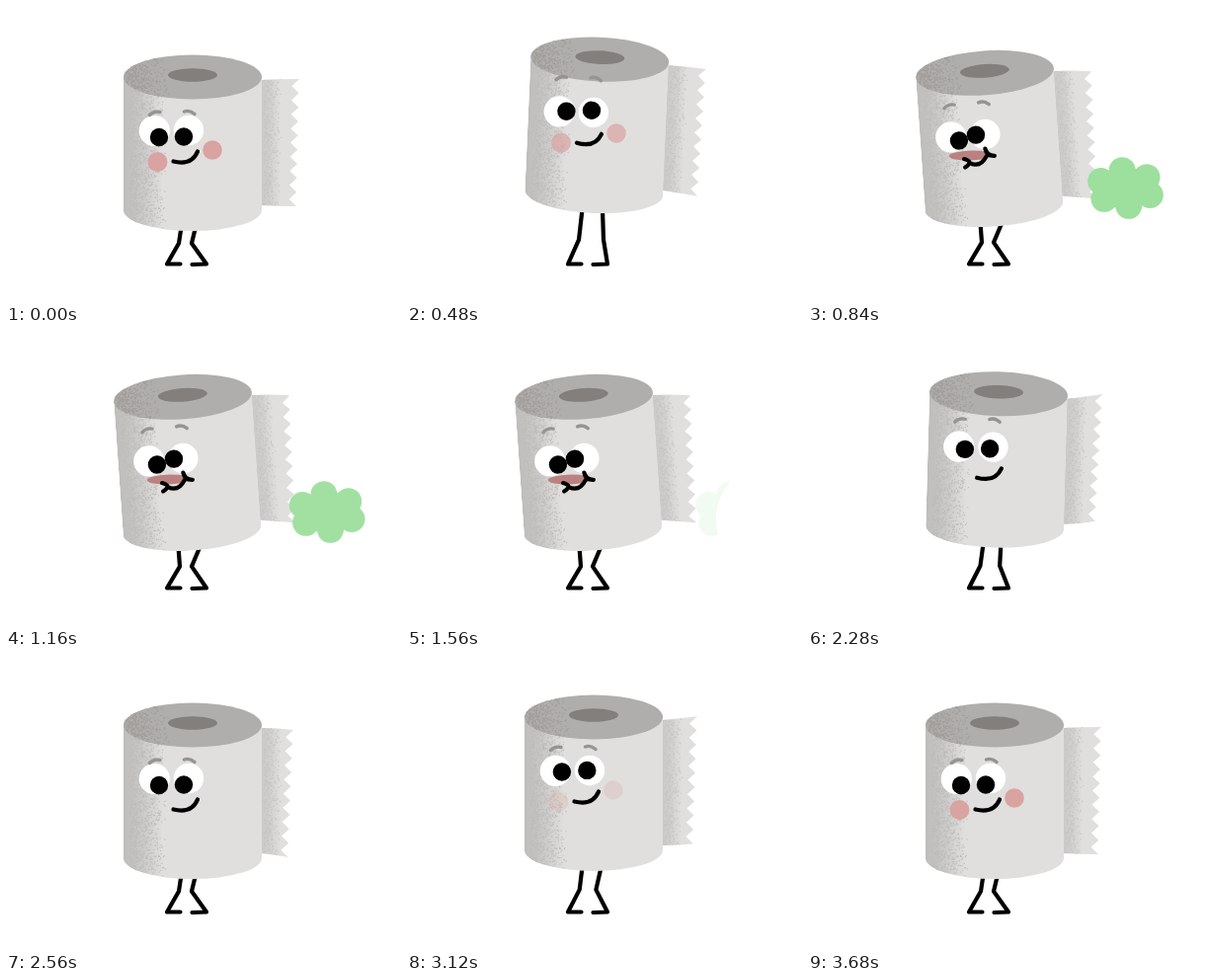
Write an HTML page that moves like this. It is 400 px wide and 300 px high and loops after 3.72 s.

```html
<!DOCTYPE html>
<html lang="en">
<head>
<meta charset="utf-8">
<title>Paper roll</title>
<style>
html, body { margin: 0; width: 100%; height: 100%; overflow: hidden; background: #fff; }
svg { display: block; width: 100vw; height: 100vh; }
.line { fill: none; stroke: #000; stroke-width: 4.2; stroke-linecap: round; stroke-linejoin: round; }
.brow { fill: none; stroke: #979391; stroke-width: 3.4; stroke-linecap: round; }
</style>
</head>
<body>
<svg viewBox="0 0 400 300">
  <defs>
    <linearGradient id="side" gradientUnits="userSpaceOnUse" x1="119" y1="0" x2="159" y2="0">
      <stop offset="0" stop-color="#bfbdbb"/>
      <stop offset=".5" stop-color="#cbcac8"/>
      <stop offset="1" stop-color="#e0dfde"/>
    </linearGradient>
    <linearGradient id="fold" gradientUnits="userSpaceOnUse" x1="259" y1="0" x2="278" y2="0">
      <stop offset="0" stop-color="#cbcac8"/>
      <stop offset=".45" stop-color="#d1d0ce"/>
      <stop offset="1" stop-color="#e0dfde"/>
    </linearGradient>
    <clipPath id="bodyClip"><path d="M119 72V207A70 21 0 0 0 259 207V72Z"/></clipPath>
    <clipPath id="topClip"><ellipse cx="189" cy="72" rx="70" ry="22.5"/></clipPath>
    <clipPath id="tailClip"><path id="tailEdge"/></clipPath>
    <mask id="wipe" maskUnits="userSpaceOnUse" x="0" y="0" width="400" height="300">
      <rect width="400" height="300" fill="#fff"/>
      <circle id="hole" cy="192" r="58" fill="#000"/>
    </mask>
  </defs>

  <path id="legL" class="line"/>
  <path id="legR" class="line"/>

  <g id="roll">
    <path id="tail" fill="url(#fold)"/>
    <path id="tailGrain" fill="#c6c5c3" clip-path="url(#tailClip)"/>
    <g clip-path="url(#bodyClip)">
      <rect x="119" y="60" width="140" height="175" fill="url(#side)"/>
      <path id="bodyGrain" fill="#bfbdbb"/>
    </g>
    <g clip-path="url(#topClip)">
      <rect x="115" y="45" width="150" height="55" fill="#b0aeac"/>
      <path id="topGrain" fill="#a19d9b"/>
      <ellipse cx="189" cy="70" rx="25" ry="6.8" fill="#827f7d"/>
    </g>
    <g id="cheeks" fill="#d9a3a2">
      <circle cx="153.5" cy="158" r="10"/>
      <circle cx="209" cy="146" r="9.8"/>
    </g>
    <g id="eyes" fill="#fff">
      <circle cx="150.3" cy="126.5" r="15.6"/>
      <circle cx="185" cy="126" r="15.2"/>
    </g>
    <ellipse id="blush" cx="169" cy="154.5" rx="22" ry="5" fill="#b98280" transform="rotate(2 169 154.5)"/>
    <circle id="pupilL" r="9.2"/>
    <circle id="pupilR" r="9.2"/>
    <g id="brows" class="brow">
      <path d="M145.5 110.5Q150 106 156 107.5"/>
      <path d="M180.5 107Q186 105 191 109.5"/>
    </g>
    <path id="smile" class="line" d="M169.5 157.5Q188 162 194 147.5"/>
    <path id="strain" class="line"
      d="M162 157.5Q172 161 162.5 166M167.5 162Q178 168 185 156M184 148.5Q185 156 193 156.5"/>
  </g>

  <g mask="url(#wipe)">
    <g id="cloud" fill="#9ddf9d">
      <ellipse cx="321.5" cy="184.5" rx="29" ry="21"/>
    </g>
  </g>
</svg>
<script>
const LOOP = 3720, STEP = 40;
const el = id => document.getElementById(id);
const set = (id, attrs) => {
  for (const k in attrs) el(id).setAttribute(k, attrs[k]);
};

// Eased step from 0 to 1, and a swell built from two of them.
function ramp(t, from, to) {
  const f = Math.min(1, Math.max(0, (t - from) / (to - from)));
  return (1 - Math.cos(Math.PI * f)) / 2;
}
const bump = (t, from, peak, to) => ramp(t, from, peak) - ramp(t, peak, to);

const inhale = t => bump(t, 0, 480, 690);
const effort = t => ramp(t, 560, 700) - ramp(t, 1620, 1860);
const hop = t => bump(t, 1640, 2040, 2560);
const bob = t => bump(t, 2560, 2960, 3460);
const lift = t => -18 * inhale(t) - 4.5 * effort(t) - 13 * hop(t) - 10.5 * bob(t);
const tilt = t => 2.5 * inhale(t) - 4 * effort(t) - 2 * bump(t, 580, 700, 840)
  - 4.6 * bump(t, 1560, 1690, 1860) + 3 * bump(t, 1780, 2080, 2500);

let seed = 7;
function rand() {
  seed = (seed * 16807) % 2147483647;
  return seed / 2147483647;
}

// Speckles that thin out towards the right.
function grain(x, y, w, h, count) {
  let d = "";
  for (let i = 0; i < count; i++) {
    const px = x + w * (1 - Math.sqrt(rand())), py = y + h * rand();
    d += `M${px.toFixed(1)} ${py.toFixed(1)}h1.2v1.2h-1.2z`;
  }
  return d;
}
set("bodyGrain", { d: grain(124, 70, 37, 160, 1500) });
set("topGrain", { d: grain(119, 48, 46, 48, 700) });
set("tailGrain", { d: grain(260, 70, 19, 145, 450) });

for (let i = 0; i < 6; i++) {
  const a = (i * 60 - 97) * Math.PI / 180;
  const lobe = document.createElementNS("http://www.w3.org/2000/svg", "circle");
  lobe.setAttribute("cx", 321.5 + 27 * Math.cos(a));
  lobe.setAttribute("cy", 184.5 + 18 * Math.sin(a));
  lobe.setAttribute("r", 13.5);
  el("cloud").append(lobe);
}

function tailPath(flap, pull) {
  const points = 18, right = 297 - pull;
  let d = `M250 75L259 75Q276 ${74 + flap * .3} ${right} ${74 + flap}`;
  for (let i = 1; i <= points; i++) {
    const f = i / points;
    d += `L${right - f * (3 + pull * .4) - (i % 2 ? 7.5 : 0)} ${74 + flap + 129 * f}`;
  }
  return d + `Q276 ${203 + flap * .3} 259 202L250 202Z`;
}

function draw(t) {
  const y = lift(t), work = effort(t), droop = bump(t, 2240, 2560, 2960);
  const up = inhale(t) + hop(t) + bob(t);
  const stretch = inhale(t) + hop(t) + .4 * bob(t);

  set("roll", { transform: `translate(0 ${y}) rotate(${tilt(t)} 189 215)` });

  // The loose end trails behind the body.
  const flap = 1.2 * (lift(t - 120) - y) + 4 * work + 5 * droop;
  const tail = tailPath(flap, 4 * hop(t) + 4 * bob(t) + 6 * droop);
  set("tail", { d: tail });
  set("tailEdge", { d: tail });

  const hip = 224 + y, knee = 240.5 + y * .2;
  set("legL", { d: `M${177.5 - 3 * work} ${hip}L${175 + work - stretch} ${knee}L163 261.5L176.5 261.5` });
  set("legR", { d: `M${192 + 6 * up + 4.5 * work} ${hip}L${188 + 11 * stretch} ${knee}L203 261.5L188.5 262` });

  set("eyes", { transform: `translate(0 ${8 * work})` });
  set("pupilL", { cx: 155 + 2.5 * up + 3.2 * work, cy: 133 - 7 * up + 5.6 * work });
  set("pupilR", { cx: 180 + 3 * up - 4.4 * work, cy: 132.5 - 8.5 * up + 1.5 * work });
  set("brows", { transform: `translate(0 ${-16 * stretch - 5.5 * work})` });
  set("cheeks", { opacity: 1 - ramp(t, 400, 620) + ramp(t, 2980, 3400) });
  set("blush", { opacity: work });

  const tense = work > .5;
  set("smile", { visibility: tense ? "hidden" : "visible" });
  set("strain", { visibility: tense ? "visible" : "hidden" });

  const fade = ramp(t, 1080, 1560);
  set("cloud", {
    transform: `translate(${287 + 9 * ramp(t, 840, 1560)} 190) scale(${ramp(t, 580, 800)}) translate(-287 -190)`,
    opacity: (1 - .87 * fade) * (1 - ramp(t, 1560, 1640))
  });
  set("hole", { cx: 442 - 71 * fade });
}

function tick() {
  const t = performance.now() % LOOP;
  draw(Math.floor(t / STEP) * STEP);
  requestAnimationFrame(tick);
}
tick();
</script>
</body>
</html>
```
